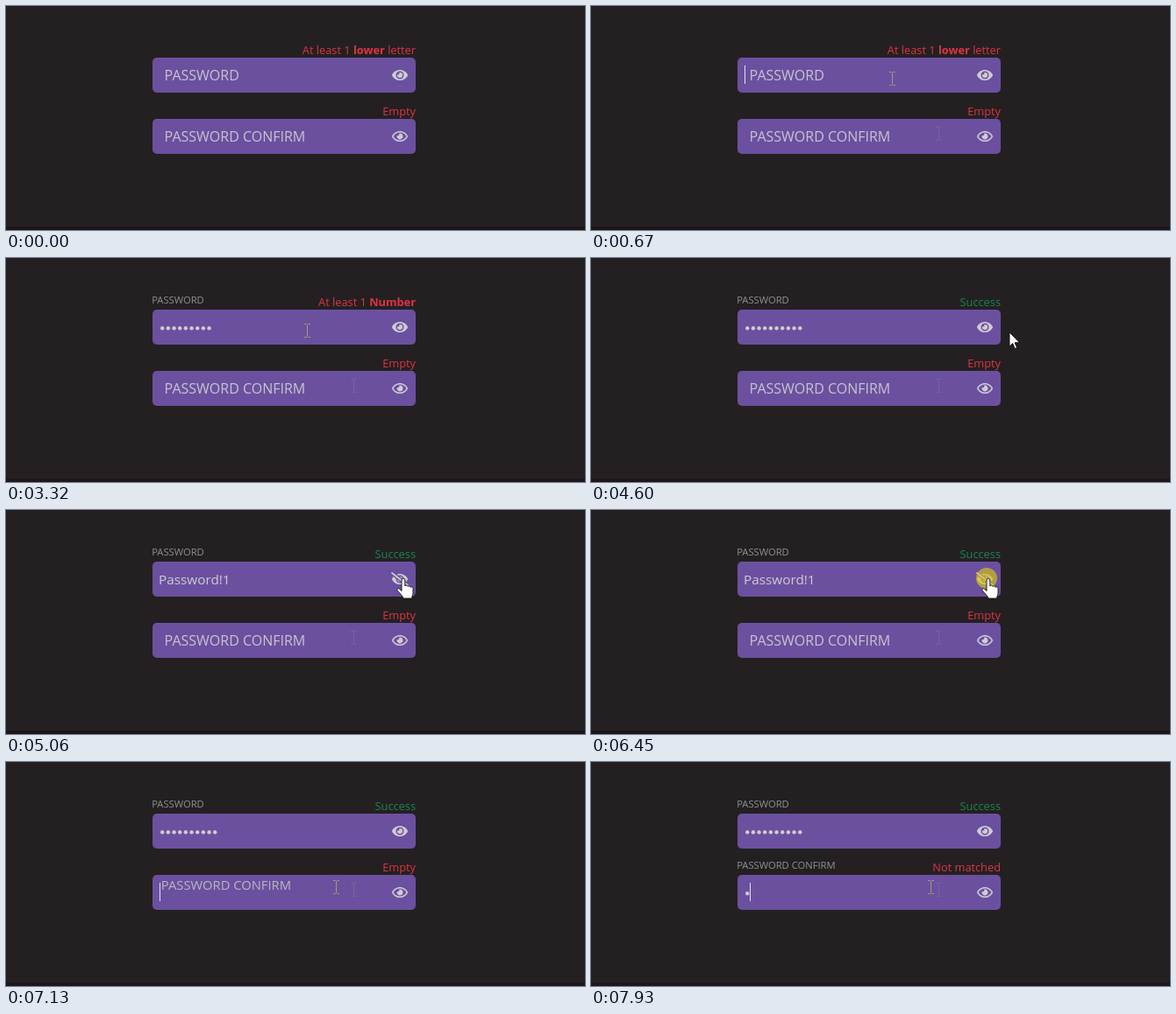
Recreate the animation shown at these times as an HTML page. Size 660 px wide and 256 px high, loop 8000 ms.

```html
<!DOCTYPE html>
<html lang="en">
<head>
<meta charset="utf-8">
<title>Password form</title>
<style>
  html, body { margin: 0; width: 660px; height: 256px; overflow: hidden; background: #242021; }
  svg { display: block; font-family: "Open Sans", "Noto Sans", sans-serif; white-space: pre; }
</style>
</head>
<body>
<svg id="stage" width="660" height="256" viewBox="0 0 660 256"></svg>
<script>
const stage = document.getElementById('stage');
const LOOP = 8000, STEP = 65;
const PURPLE = '#6b50a0', RED = '#dc3545', GREEN = '#198754', LIGHT = '#cfcbd2';

const rim = 'M572.5 241.4C518.3 135.6 410.9 64 288 64S57.7 135.6 3.5 241.4a32 32 0 0 0 0 29.2C57.7 376.4 165 448 288 448s230.3-71.6 284.5-177.4a32 32 0 0 0 0-29.2z';
const solidEye = rim + 'M288 400a144 144 0 1 1 144-144 144 144 0 0 1-144 144zm0-240a95 95 0 0 0-25.3 3.8 48 48 0 0 1-66.9 66.9A96 96 0 1 0 288 160z';
const lineEye = rim + 'M288 400c-98.7 0-189-55-238-144 49-89 139.300-144 238-144s189 55 238 144c-49 89-139.300 144-238 144zM288 144a111 111 0 0 0-31.200 5 55 55 0 0 1 7.200 27 56 56 0 0 1-56 56 55 55 0 0 1-27-7.200A112 112 0 1 0 288 144z';

const arrow = 'M0 0V16L3.700 12.600 6.200 18.500 8.600 17.500 6 11.700H11.500z';
const hand = 'M0 2a1.900 1.900 0 0 1 3.800 0V9c.5-1.500 3.200-1.200 3.400.6.6-1.300 3-1 3.200.8.6-1 2.600-.6 2.600 1V17c0 2-1.200 3-1.400 6H2C1.500 20-4 16-5 13.500c-.6-1.800 1.600-2.600 2.800-1L0 14.500z';
const beam = 'M-3.500-7.500H-1L0-6.500 1-7.500H3.500M0-6.500V6.500M-3.500 7.500H-1L0 6.500 1 7.500H3.500';

// The first entry of keys is the focus, the rest are key presses.
const fields = [
  { top: 59, label: 'PASSWORD', eye: solidEye, lit: 470,
    keys: [655, 1320, 1530, 1580, 1730, 1930, 2020, 2110, 2310, 2840, 3870],
    notes: [[0, 'At least 1 <tspan font-weight="700">lower</tspan> letter', RED],
            [1640, 'At least 1 <tspan font-weight="700">Number</tspan>', RED],
            [3990, 'Success', GREEN]] },
  { top: 129, label: 'PASSWORD CONFIRM', eye: lineEye, lit: 535,
    keys: [7063, 7800],
    notes: [[0, 'Empty', RED], [7930, 'Not matched', RED]] }
];

// Pointer path: time, x, y
const path = [
  [70, 597, 243], [260, 397, 146], [450, 334, 81], [590, 334, 81], [655, 343, 83],
  [4330, 343, 83], [4590, 477, 85], [4730, 477, 85], [4860, 451, 78],
  [6590, 451, 78], [6720, 430, 72], [6980, 376, 143], [7200, 376, 143], [7260, 387, 143]
];

const mix = (a, b, u) => a + (b - a) * u;
const between = (t, a, b) => t >= a && t < b;
const smooth = u => u * u * (3 - 2 * u);
const clamp = u => Math.max(0, Math.min(1, u));

function pointerAt(t) {
  const i = path.findLastIndex(p => p[0] <= t);
  const [t0, x0, y0] = path[i];
  const [t1, x1, y1] = path[i + 1] || [LOOP, x0, y0];
  const u = Math.floor((t - t0) / STEP) * STEP / (t1 - t0);
  return [mix(x0, x1, u), mix(y0, y1, u)];
}

function drawBeam(x, y, opacity = 1) {
  return `<path d="${beam}" transform="translate(${Math.round(x) + .5} ${Math.round(y)})" fill="none" stroke="#98a272" opacity="${opacity}"/>`;
}

function drawPointer(t) {
  if (t < path[0][0]) return '';
  const [x, y] = pointerAt(t);
  const inField = between(x, 167, 467) && fields.some(f => between(y, f.top, f.top + 40));
  const onEye = inField && between(x, 440, 459);
  if (inField && !onEye) return drawBeam(x, y);
  return `<path d="${onEye ? hand : arrow}" transform="translate(${x} ${y})" fill="#fff" stroke="#111" stroke-width=".9"/>`;
}

function drawLabel(f, t) {
  const u = smooth(clamp(Math.floor((t - f.keys[0]) / 67) / 3));
  const color = [200, 196, 205].map((c, i) => Math.round(mix(c, [143, 147, 143][i], u)));
  return `<text x="${mix(180.6, 166.2, u)}" y="${f.top + mix(26, -7, u)}" font-size="${mix(16, 11.2, u)}" fill="rgb(${color})">${f.label}</text>`;
}

function drawField(f, t) {
  const { top, keys } = f;
  const pressed = keys.filter(k => k <= t);
  const count = Math.max(0, pressed.length - 1);
  const shown = top === 59 && between(t, 5060, 6590);
  const [, note, color] = f.notes.findLast(n => n[0] <= t);
  let out = `<rect x="167" y="${top}" width="300" height="40" rx="5" fill="${PURPLE}"/>`;
  out += `<path d="${f.eye}" fill-rule="evenodd" fill="${LIGHT}" transform="translate(440 ${top + 12}) scale(.03125)"/>`;
  if (shown) {
    const slash = `M440 ${top + 13}L458 ${top + 27}`;
    out += `<path d="${slash}" stroke="${PURPLE}" stroke-width="4.500"/><path d="${slash}" stroke="${LIGHT}" stroke-width="1.700" stroke-linecap="round"/>`;
    out += `<text x="174" y="${top + 26}" font-size="15.3" fill="${LIGHT}">Password!1</text>`;
  } else {
    for (let i = 0; i < count; i++)
      out += `<circle cx="${178.2 + i * 6.67}" cy="${top + 21.2}" r="2.2" fill="${LIGHT}"/>`;
  }
  if (pressed.length && t - pressed.at(-1) < f.lit)
    out += `<rect x="${Math.floor(175 + count * 6.67)}" y="${top + 9}" width="1" height="21" fill="#e4e0e8"/>`;
  out += `<text x="467" y="${top - 4}" font-size="12.8" text-anchor="end" fill="${color}">${note}</text>`;
  return out + drawLabel(f, t);
}

function draw(now) {
  const t = now % LOOP;
  const pressing = between(t, 4920, 5060) || between(t, 6450, 6590);
  stage.innerHTML = '<rect y="252" width="660" height="4" fill="#1d161a"/>'
    + fields.map(f => drawField(f, t)).join('')
    + (t > 330 ? drawBeam(396, 146, .25) : '')
    + (pressing ? '<circle cx="451" cy="78" r="12" fill="#d9c614" opacity=".66"/>' : '')
    + drawPointer(t);
}

const start = performance.now();
function tick() {
  draw(performance.now() - start);
  requestAnimationFrame(tick);
}
tick();
</script>
</body>
</html>
```
